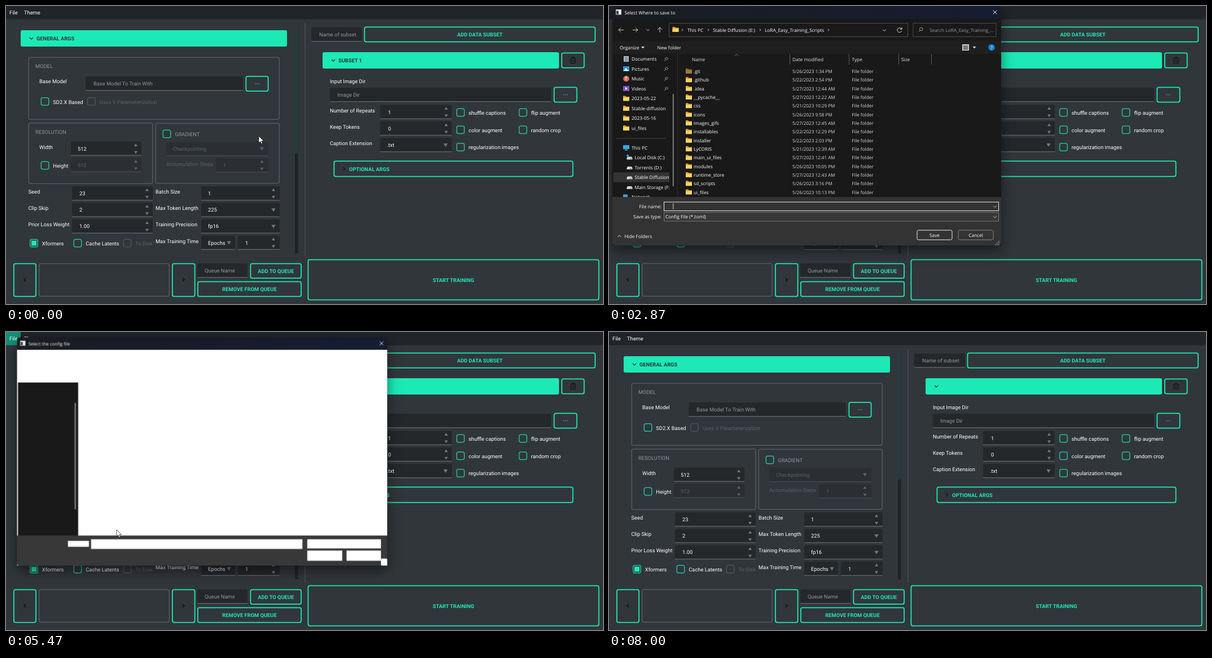
An HTML page for the animation above (8140 ms loop, 1058 px wide and 529 px high).

```html
<!DOCTYPE html>
<html lang="en">
<head>
<meta charset="utf-8">
<title>Training setup: save and load a config</title>
<style>
html, body { margin: 0; width: 100%; height: 100%; overflow: hidden; background: #31363b; }
svg { display: block; }
#stage { width: 100vw; height: 100vh; }
text { font: 9.3px Roboto, sans-serif; text-rendering: geometricPrecision; white-space: pre; }
.bold { font-weight: 700; }
.dialog text { font: 8.3px "Open Sans", "Noto Sans", sans-serif; }
.dialog .date { font-size: 8.1px; }
.dialog { filter: drop-shadow(0 9px 11px rgba(0, 0, 0, .5)); transform-origin: 288px 204px; opacity: 0; }

/* One shared 8140 ms loop: 1% is 81.4 ms. */
.anim { animation: 8.14s step-end infinite; }
#header { animation-name: header; }
#fileOn { animation-name: fileOn; }
#menu { animation-name: menu; }
#hoverSave { animation-name: hoverSave; }
#hoverLoad { animation-name: hoverLoad; }
#subset { animation-name: subset; }
#saveDialog { animation-name: saveDialog; animation-timing-function: ease-out; }
#saveBlank { animation-name: saveBlank; }
#typed { animation-name: typed; }
#caret { animation-name: caret; }
#openDialog { animation-name: openDialog; animation-timing-function: ease-out; }
#openBlank { animation-name: openBlank; }
#picked, #pickedName { animation-name: picked; }
#cursor { animation-name: move, cursorOn; animation-timing-function: ease-in-out, step-end;
  animation-duration: 8.14s; animation-iteration-count: infinite; }

@keyframes header { 0%, 98.2% { fill: #1de9b6 } 10.6% { fill: #24c79f } }
@keyframes fileOn { 0%, 24.4%, 71% { opacity: 0 } 8.2%, 56.4% { opacity: 1 } }
@keyframes menu { 0%, 17.15%, 64.7% { opacity: 0 } 10.6%, 58.9% { opacity: 1 } }
@keyframes hoverSave { 0%, 17.1%, 61.5% { opacity: 0 } 12.2%, 60.5% { opacity: 1 } }
@keyframes hoverLoad { 0%, 64.7% { opacity: 0 } 61.5% { opacity: 1 } }
@keyframes subset { 0% { opacity: 1 } 87.5%, 100% { opacity: 0 } }
@keyframes saveDialog {
  0%, 20.3% { opacity: 0; transform: scale(.92) }
  21.1%, 21.3% { opacity: 1; transform: scale(.953) }
  23.7%, 41.8% { opacity: 1; transform: none }
  44.2%, 100% { opacity: 0; transform: scale(.92) }
}
@keyframes saveBlank { 0% { opacity: 1 } 22.9%, 100% { opacity: 0 } }
@keyframes typed { 0% { width: 0 } 31.9% { width: 2.9px } 33.5% { width: 7.6px } 35.2% { width: 11.6px } 35.9%, 100% { width: 15px } }
@keyframes caret {
  0% { transform: none } 31.9% { transform: translateX(2.9px) } 33.5% { transform: translateX(7.6px) }
  35.2% { transform: translateX(11.6px) } 35.9%, 100% { transform: translateX(14.6px) }
}
@keyframes openDialog {
  0%, 66.2% { opacity: 0; transform: scale(.92) }
  67.1%, 67.3% { opacity: 1; transform: scale(.953) }
  69.6%, 86% { opacity: 1; transform: none }
  88.4%, 100% { opacity: 0; transform: scale(.92) }
}
@keyframes openBlank { 0% { opacity: 1 } 68.7%, 100% { opacity: 0 } }
@keyframes picked { 0% { opacity: 0 } 75.2%, 100% { opacity: 1 } }
@keyframes move {
  0%, .4% { transform: translate(448px, 231px) }
  8.2%, 11.2% { transform: translate(12px, 17px) }
  13.9%, 16.6% { transform: translate(60px, 44px); animation-timing-function: ease-in }
  21.25% { transform: translate(104px, 202px); animation-timing-function: ease-out }
  27%, 36.5% { transform: translate(287px, 371px) }
  41%, 46.8% { transform: translate(577px, 396px) }
  55.7% { transform: translate(9px, 10px) }
  56.5%, 59.5% { transform: translate(12px, 20px) }
  62.3%, 64% { transform: translate(58px, 66px); animation-timing-function: ease-in }
  67.1%, 67.3% { transform: translate(196px, 351px) }
  74.4%, 76.5% { transform: translate(179.5px, 354px) }
  84.6%, 86.4% { transform: translate(586px, 400px); animation-timing-function: ease-in }
  90.9%, 100% { transform: translate(640px, 540px) }
}
@keyframes cursorOn { 0%, 36.8% { opacity: 1 } 31.9% { opacity: 0 } }
</style>
</head>
<body>
<svg id="stage" viewBox="0 0 1058 529" xmlns="http://www.w3.org/2000/svg"></svg>
<script>
const TEAL = '#1de9b6', DARK = '#232629', PANEL = '#31363b', LINE = '#545960';
const GREY = '#92969a', OFF = '#5c6167', MARK = '#74787c';

const rect = (x, y, x2, y2, fill, more = '') =>
  `<rect x="${x}" y="${y}" width="${x2 - x}" height="${y2 - y}" fill="${fill}" ${more}/>`;
const text = (x, y, s, fill = '#fff', more = '') =>
  `<text x="${x}" y="${y}" fill="${fill}" ${more}>${s}</text>`;
const path = (d, stroke, more = '') => `<path d="${d}" fill="none" stroke="${stroke}" ${more}/>`;
const shape = (d, fill) => `<path d="${d}" fill="${fill}"/>`;
const group = (id, body, cls = 'anim') => `<g id="${id}" class="${cls}">${body}</g>`;

const frame = (x, y, x2, y2, color = LINE, w = 1.5) =>
  rect(x + w / 2, y + w / 2, x2 - w / 2, y2 - w / 2, 'none', `rx="3" stroke="${color}" stroke-width="${w}"`);
const button = (x, y, x2, y2, s = '') => frame(x, y, x2, y2, TEAL, 1.8) +
  text((x + x2) / 2, (y + y2) / 2 + 3.5, s, TEAL, 'class="bold" text-anchor="middle"');
const down = (x, y, c = MARK) => shape(`M${x - 3.7} ${y - 2.5}h7.4l-3.7 6z`, c);
const spin = (x, y, c = MARK) =>
  shape(`M${x - 3} ${y + 8.5}h6l-3-5zM${x - 3} ${y + 17}h6l-3 5z`, c);
const chevron = (x, y, dir, c, w = 1.4, r = 3) => path({
  down: `M${x - r} ${y - r / 2}l${r} ${r} ${r} ${-r}`, up: `M${x - r} ${y + r / 2}l${r} ${-r} ${r} ${r}`,
  left: `M${x + r / 2} ${y - r}l${-r} ${r} ${r} ${r}`, right: `M${x - r / 2} ${y - r}l${r} ${r} ${-r} ${r}`
}[dir], c, `stroke-width="${w}"`);
const field = (x, y, x2, s, tx, color = '#fff', off = false) =>
  shape(`M${x} ${y + 25}V${y + 3}q0-3 3-3H${x2 - 3}q3 0 3 3V${y + 25}z`, off ? '#2b2f33' : '#24282b') +
  rect(x, y + 24, x2, y + 25.5, off ? '#43484e' : '#5b6066') + text(tx, y + 16, s, color);
const check = (x, y, s, off = false, color = off ? OFF : '#fff') =>
  frame(x - 7.5, y - 7.5, x + 7.5, y + 7.5, off ? '#4c5157' : '#20bd98', 1.5) + text(x + 14.3, y + 4, s, color);
const dots = (x, y) => [-3.2, 0, 3.2].map(d => rect(x + d - .8, y - .8, x + d + .8, y + .8, '#27a98a')).join('');

function leftPanel() {
  const rows = [['Seed', '23', 'Batch Size', '1'], ['Clip Skip', '2', 'Max Token Length', '225'],
    ['Prior Loss Weight', '1.00', 'Training Precision', 'fp16']];
  return rect(26, 43, 498, 72, TEAL, 'id="header" class="anim" rx="3"') + chevron(45, 57.5, 'down', PANEL) +
    text(54, 61, 'GENERAL ARGS', PANEL, 'class="bold"') +
    frame(39.5, 90.5, 485, 202) + text(52, 110, 'MODEL', GREY) + text(59, 137, 'Base Model') +
    field(141, 125, 420, 'Base Model To Train With', 155, GREY) + button(424.5, 124, 465.5, 152) + dots(445, 138) +
    check(69, 169.5, 'SD2.X Based') + check(151.5, 169.5, 'Uses V Parameterization', true) +
    frame(39.5, 207, 260.5, 316) + text(52, 227, 'RESOLUTION', GREY) + text(59, 254, 'Width') +
    field(115, 240.5, 240, '512', 127) + spin(230, 240.5) + check(69, 283, 'Height') +
    field(115, 269.5, 240, '512', 127, OFF, true) + spin(230, 269.5, OFF) +
    frame(264.5, 207.5, 485, 315.5) + check(285, 227, 'GRADIENT', false, GREY) +
    field(284, 241, 465, 'Checkpointing', 296, OFF, true) + down(453.5, 253, OFF) +
    text(284, 284, 'Accumulation Steps', OFF) + field(372, 270, 465, '1', 385, OFF, true) + spin(453.5, 270, OFF) +
    rows.map(([a, av, b, bv], i) => {
      const y = 320 + i * 29.2;
      return text(39.5, y + 13, a) + field(117, y, 260, av, 130) + spin(250, y) +
        text(265, y + 13, b) + field(346, y, 485, bv, 358) + (i ? down(474, y + 12.5) : spin(474, y));
    }).join('') +
    text(265, 421, 'Max Training Time') + field(346, 407.5, 406, 'Epochs', 358) + down(395, 420) +
    field(411, 407.5, 485, '1', 424) + spin(474, 407.5) +
    check(49.5, 421, 'Xformers') + rect(45, 416.5, 54, 425.5, TEAL) +
    check(127, 421, 'Cache Latents') + check(215, 421, 'To Disk', true) +
    rect(512, 36, 517.5, 439, '#1f2225') + rect(512, 36, 517.5, 262, '#233c3a') +
    rect(529.5, 30, 530.5, 445, LINE);
}

function rightPanel() {
  const checks = [['shuffle captions', 'flip augment'], ['color augment', 'random crop'], ['regularization images']];
  const rows = [['Number of Repeats', '1', 677], ['Keep Tokens', '0', 677], ['Caption Extension', '.txt', 675]];
  return field(541, 38, 631, 'Name of subset', 555, GREY) + button(634.5, 36.5, 1045, 64.5, 'ADD DATA SUBSET') +
    rect(561, 82, 980, 111, TEAL, 'rx="3"') + chevron(580, 96.5, 'down', PANEL) +
    text(589, 100, 'SUBSET 1', PANEL, 'id="subset" class="bold anim"') + button(984, 82.5, 1025.5, 110.5) +
    path('M1000 93h10M1003 92.5v-1.5h4v1.5M1001 93.5v8h8v-8M1003.7 95.5v4M1006.3 95.5v4', '#101315', 'stroke-width="1.1"') +
    text(574, 137, 'Input Image Dir') + field(574, 145, 966, 'Image Dir', 587, GREY) +
    button(970.5, 143.5, 1012.5, 171.5) + dots(991.5, 157.5) +
    rows.map(([name, value, x], i) => {
      const y = 175.5 + i * 29.2;
      return text(574, y + 13.3, name) + field(663, y, 790, value, x) + (i < 2 ? spin(780, y) : down(779, y + 12.5));
    }).join('') +
    checks.map((names, i) => names.map((s, j) => check(805.5 + j * 110.7, 189 + i * 30.7, s)).join('')).join('') +
    button(580.5, 274.5, 1005.5, 303.5) + chevron(599, 289, 'right', '#101315', 1.2) +
    text(608, 293, 'OPTIONAL ARGS', TEAL, 'class="bold"');
}

function bottomBar() {
  return button(13, 456.5, 54, 516.5) + chevron(33.5, 486, 'left', '#101315', 1.6) +
    frame(58, 456.5, 290, 516) + button(294, 456.5, 335.5, 516.5) + chevron(314.5, 486, 'right', '#101315', 1.6) +
    field(339, 457, 428, 'Queue Name', 352, GREY) + button(432.5, 456.5, 524, 484, 'ADD TO QUEUE') +
    button(339, 488.5, 524, 516.5, 'REMOVE FROM QUEUE') + button(534.5, 449.5, 1051.5, 522.5, 'START TRAINING');
}

function menuBar() {
  const item = (id, y, s) => rect(0, y, 112, y + 25, '#15957c', `id="${id}" class="anim"`) + text(24, y + 16, s);
  return rect(0, 0, 1058, 23.5, '#212428') + rect(0, 0, 26, 23.5, '#12917a', 'id="fileOn" class="anim"') +
    text(6, 15, 'File') + text(32, 15, 'Theme') +
    group('menu', rect(0, 24, 112, 91, DARK) + item('hoverSave', 32, 'Save Toml') + item('hoverLoad', 57, 'Load Toml'));
}

const folder = (x, y, dim) => shape(`M${x} ${y - 4.5}h4l1.5 1.5h5.5v7h-11z`, dim ? '#8a6a2c' : '#dca12f') +
  shape(`M${x} ${y - 1.5}h11v6h-11z`, dim ? '#9b7c3f' : '#fbd465');
const icons = {
  folder: y => folder(25, y),
  Desktop: y => rect(25, y - 4, 36, y + 4, '#1b8fdc') + rect(27, y - 2, 30, y, '#8fd6ff'),
  Downloads: y => path(`M30.5 ${y - 5}v7m-3-3l3 3 3-3M26 ${y + 5}h9`, '#2fb98a', 'stroke-width="1.4"'),
  Documents: y => rect(26, y - 5, 35, y + 5, '#a9bac9') + path(`M28 ${y - 2}h5m-5 2.5h5m-5 2.5h5`, '#4a6076'),
  Pictures: y => rect(25, y - 4.5, 36, y + 4.5, '#2493df') + shape(`M26 ${y + 3.5}l4-5 5 5z`, '#fff'),
  Music: y => `<circle cx="30.5" cy="${y}" r="5.3" fill="#d5705c"/>` + path(`M30 ${y + 2}v-5l2.5 1`, '#fff'),
  Videos: y => rect(25, y - 4.5, 36, y + 4.5, '#8250cf') + shape(`M29 ${y - 2.5}l4 2.5-4 2.5z`, '#fff'),
  'This PC': y => rect(25, y - 4.5, 36, y + 2.5, '#35a8e0') + rect(28, y + 3.5, 33, y + 4.7, '#a8c6d8'),
  Network: y => rect(25, y - 4.5, 33, y + 1, '#35a8e0') + rect(29, y, 36, y + 5, '#7fb8d8'),
  drive: y => shape(`M33 ${y - 1.5}h7l1.5 2.5v2.5h-10v-2.5z`, '#d5d9dc') + rect(37, y + 1.4, 40, y + 2.4, '#3c9a5c')
};

function sidebar(names, bottom, scrollTop) {
  const rows = names.map((name, i) => {
    const y = 94 + i * 17.5, pinned = /^D[eo]|^Pi|^Mu|^Vi/.test(name);
    if (!name) return rect(13, y + .5, 101, y + 1.5, '#444');
    const drive = /\(|Diffusion/.test(name);
    return (name === 'Stable Diffusion' ? rect(8, y - 8.7, 107, y + 8.7, '#343434') : '') +
      (icons[name] || icons[drive ? 'drive' : 'folder'])(y) +
      (name.startsWith('Local') ? rect(31, y - 5, 35, y - 2, '#29a3e8') : '') +
      text(drive ? 45.5 : 40, y + 3, name) +
      (pinned ? path(`M${98} ${y + 3.5}l2.5-2.5M99 ${y - 1.5}l3.5 3.5M100.3 ${y - 1}l2-2 2.4 2.4-2 2`, '#aaa') : '');
  });
  return `<svg width="107" height="${bottom}"><svg y="85" width="107" height="${bottom - 85}" viewBox="0 85 107 ${bottom - 85}">` +
    rows.join('') + '</svg></svg>' + rect(113, scrollTop, 114.5, 320, '#999') + rect(121, 85, 122, bottom, '#2c2c2c');
}

const files = `.git 26 1:34 PM|.github 22 2:54 PM|.idea 27 12:44 AM|__pycache__ 27 12:22 AM|css 21 10:29 PM|icons 26 9:58 PM
images_gifs 27 12:45 AM|installables 22 12:29 PM|installer 22 2:03 PM|LyCORIS 21 12:39 AM|main_ui_files 27 12:41 AM
modules 26 10:05 PM|runtime_store 27 12:43 AM|sd_scripts 26 3:16 PM|ui_files 26 10:13 PM`.split(/[|\n]/);
const fileRow = (i, name, day, time, kind) => {
  const y = 119 + i * 15.33;
  return text(150, y, name) + text(325, y, `5/${day}/2023 ${time}`, '#d8d8d8', 'class="date"') + text(430.5, y, kind, '#d8d8d8');
};
const fileList = () => files.map((line, i) => {
  const [name, day, ...time] = line.split(' ');
  return folder(136, 115.5 + i * 15.33, !i) + fileRow(i, name, day, time.join(' '), 'File folder');
}).join('');

const columns = nameX => text(nameX, 98, 'Name', '#e4e4e4') + text(325, 98, 'Date modified', '#e4e4e4') +
  text(430.5, 98, 'Type', '#e4e4e4') + text(518, 98, 'Size', '#e4e4e4') + chevron(226, 87, 'up', '#999', .8) +
  [320.5, 425.5, 513.5, 571.5].map(x => rect(x - .4, 85, x + .5, 104, '#666')).join('');
const box = (x, y, x2, y2, fill, stroke) => rect(x + .5, y + .5, x2 - .5, y2 - .5, fill, `stroke="${stroke}"`);
const pill = (x, x2, s, stroke) => rect(x, 398, x2, 415, '#333', `rx="2.5" stroke="${stroke}"`) +
  text((x + x2) / 2, 409.5, s, '#fff', 'text-anchor="middle"');

function explorer(bottom, viewX) {
  const crumbs = [[139, 'This PC', 176], [184, 'Stable Diffusion (E:)', 268], [276, 'LoRA_Easy_Training_Scripts', 389]];
  return rect(6, 21, 695, 425, '#191919') + rect(6, 62, 695, 85, '#1f1f1f') + rect(6, bottom, 695, 425, '#333', 'rx="5"') +
    rect(6, bottom, 695, bottom + 8, '#333') +
    path('M26 42.5h-9m4-4l-4 4 4 4M42 42.5h9m-4-4l4 4-4 4M90 47v-9m-4 4l4-4 4 4', '#ccc') + chevron(69, 42.5, 'down', '#aaa', 1) +
    box(106, 30, 530, 55, '#191919', '#4c4c4c') + folder(112.5, 41.5) + chevron(130, 42.5, 'right', '#ddd', 1, 2) +
    crumbs.map(([x, s, end]) => text(x, 45.5, s) + chevron(end, 42.5, 'right', '#ddd', 1, 2)).join('') +
    chevron(488, 43, 'down', '#ccc', 1) + path('M518.5 41a4 4 0 1 0 .2 3M519 38v3.3h-3.2', '#ddd') +
    box(538.5, 30, 686.5, 55, '#191919', '#4c4c4c') + path('M556 41a2.8 2.8 0 1 0-5.600 0a2.8 2.8 0 1 0 5.600 0M551 43.500l-2 2.500', '#999') +
    text(568, 45.5, 'Search LoRA_Easy_Training_...', '#999') +
    text(19, 76.500, 'Organize') + shape('M57 72h6l-3 3.500z', '#ddd') + text(85.5, 76.5, 'New folder') +
    box(viewX, 68, viewX + 12, 79, '#aaa', '#ddd') + path(`M${viewX + 2} 71.500h8m-8 2.500h8m-8 2.500h8`, '#333') +
    shape(`M${viewX + 18.500} 72h6l-3 3.500z`, '#ddd') +
    '<circle cx="678" cy="73.500" r="5.700" fill="#1583d8"/>' + text(678, 76.700, '?', '#fff', 'text-anchor="middle"') +
    columns(147) + fileList() + [[690, 418], [690, 421], [687, 421], [690, 424], [687, 424], [684, 424]]
      .map(([x, y]) => rect(x, y - 1, x + 1.500, y + .500, '#aaa')).join('');
}

const titleBar = s => shape('M6 23V5q0-5 5-5H690q5 0 5 5V23z', 'url(#title)') +
  box(12, 6, 22, 15.5, '#e8eef2', '#b9c6cf') + rect(13, 8.500, 17, 14.500, '#2e4a5a') + text(27.5, 14.700, s) +
  path('M680.500 7.500l7 7m0-7l-7 7', '#eee');

const blankBase = (paneBottom, grey) => rect(6, 21, 695, 425, '#fff') + rect(8, 84, 120, paneBottom, '#191919') +
  rect(6, grey, 695, 425, '#383838', 'rx="4"') + rect(6, grey, 695, grey + 8, '#383838') +
  rect(546, 397, 611, 416, '#fff') + rect(619, 397, 683, 416, '#fff') + rect(683, 412, 695, 425, '#fff', 'rx="2"');

function saveDialog() {
  const names = ['Documents', 'Pictures', 'Music', 'Videos', '2023-05-22', 'Stable-diffusion', '2023-05-16', 'ui_files',
    '', 'This PC', 'Local Disk (C:)', 'Torrents (D:)', 'Stable Diffusion', 'Main Storage (F:)', 'Network'];
  const blank = blankBase(339, 387) + rect(113.5, 155, 115.5, 320, '#999') + rect(123, 84, 695, 339, '#191919') + columns(135) +
    text(409, 122.5, 'Working on it...', '#ddd', 'text-anchor="middle"') + rect(13, 401, 91, 416, '#fff');
  return group('saveDialog', explorer(339, 626) + sidebar(names, 339, 156) +
    text(93, 359, 'File name:', '#fff', 'text-anchor="end"') + box(97, 347.5, 691, 364, '#333', '#eee') +
    '<svg id="typed" class="anim" x="101.5" y="348" width="0" height="16">' + text(0, 11, 'test') + '</svg>' +
    rect(101.7, 350, 102.5, 361, '#fff', 'id="caret" class="anim"') + chevron(684, 356, 'down', '#bbb', 1) +
    text(93, 377, 'Save as type:', '#fff', 'text-anchor="end"') + box(97, 366, 691, 382.5, '#383838', '#777') +
    text(100, 377, 'Config File (*.toml)') + chevron(684, 374.5, 'down', '#bbb', 1) +
    chevron(18.5, 408.5, 'up', '#ddd', 1) + text(27.5, 411.5, 'Hide Folders') +
    pill(546, 608, 'Save', '#eee') + pill(619, 681, 'Cancel', '#888') +
    group('saveBlank', blank) + titleBar('Select Where to save to'), 'dialog anim');
}

function openDialog() {
  const names = ['', 'Desktop', 'Downloads', 'Documents', 'Pictures', 'Music', 'Videos', 'Stable-diffusion', '2023-05-16',
    'ui_files', 'LoRA_Easy_Training_Scripts', '', 'This PC', 'Local Disk (C:)', 'Torrents (D:)', 'Stable Diffusion'];
  const blank = blankBase(369, 369) + rect(113.5, 122, 115.5, 320, '#999') + rect(101, 379, 140, 390, '#fff') +
    rect(144, 376, 537, 394, '#fff') + rect(546, 376, 683, 393, '#fff');
  return group('openDialog', explorer(369, 605) + sidebar(names, 369, 123) +
    box(646, 68.5, 657.5, 79, '#eee', '#eee') + rect(652.5, 70, 656.5, 78, '#1583d8') + rect(647.5, 70, 652, 78, '#222') +
    rect(133, 338, 569, 354, '#4d4d4d') + rect(133, 338, 569, 354, '#6c6c6c', 'id="picked" class="anim"') +
    rect(136.5, 341, 145, 351, '#dfe8c8') + rect(139, 344, 144, 349, '#7fb54b') +
    fileRow(15, 'test.toml', 27, '12:46 AM', 'TOML File') + text(566, 349, '2 KB', '#d8d8d8', 'text-anchor="end"') +
    text(140, 387.5, 'File name:', '#fff', 'text-anchor="end"') + box(143.5, 376, 536.5, 393, '#333', '#eee') +
    text(147.5, 387.5, 'test.toml', '#fff', 'id="pickedName" class="anim"') + chevron(529, 385, 'down', '#bbb', 1) +
    box(545, 376, 682.5, 392.5, '#383838', '#888') + text(548, 387.5, 'Config File (*.toml)') + chevron(675.5, 384.5, 'down', '#bbb', 1) +
    pill(546, 608, 'Open', '#eee') + pill(619, 681, 'Cancel', '#888') +
    group('openBlank', blank) + titleBar('Select the config file'), 'dialog anim');
}

document.getElementById('stage').innerHTML =
  '<defs><linearGradient id="title"><stop stop-color="#1b1d22"/><stop offset="1" stop-color="#161c32"/></linearGradient></defs>' +
  rect(0, 0, 1058, 529, PANEL) + leftPanel() + rightPanel() + bottomBar() + menuBar() + saveDialog() + openDialog() +
  group('cursor', '<path d="M0 0V12L2.700 9.400 4.500 13.600 6.500 12.800 4.700 8.700H8.600Z" fill="#fff" stroke="#111" stroke-width=".700"/>', '');
</script>
</body>
</html>
```
